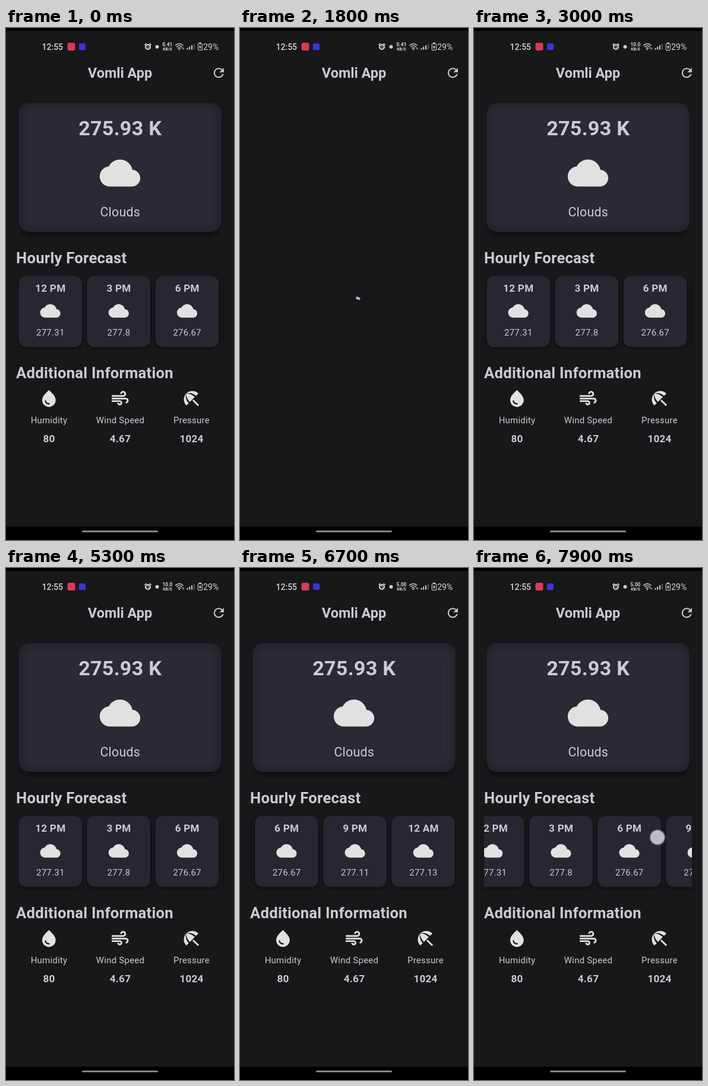
Write an HTML page that moves like this. It is 384 by 864 pixels and loops after 8000 ms.

```html
<!DOCTYPE html>
<html lang="en">
<head>
<meta charset="utf-8">
<title>Weather</title>
<style>
html, body { margin: 0; height: 100%; overflow: hidden; background: #000; }
svg { display: block; width: 100vw; height: 100vh; }
text { font-family: Roboto, "Open Sans", sans-serif; fill: #cdcad0; letter-spacing: .267px; }
.mid { text-anchor: middle; }
.b { font-weight: 700; }
.bar text { letter-spacing: 0; fill: #d6d6d6; }
.icon { fill: #e1e1e1; }
</style>
</head>
<body>
<svg viewBox="0 0 384 864">
  <defs>
    <clipPath id="listClip"><rect x="17" y="410" width="350" height="140"/></clipPath>
    <clipPath id="cardClip"><rect x="21.4" y="127" width="341.3" height="217" rx="17"/></clipPath>
    <filter id="soft" x="-10%" y="-10%" width="120%" height="120%"><feGaussianBlur stdDeviation="6"/></filter>
    <filter id="shade" x="-10%" y="-10%" width="120%" height="125%"><feGaussianBlur stdDeviation="2.2"/></filter>
    <radialGradient id="touchFill">
      <stop offset="0" stop-color="#bfbdc3" stop-opacity=".95"/>
      <stop offset=".65" stop-color="#cfcdd2" stop-opacity=".92"/>
      <stop offset=".76" stop-color="#d4d2d8" stop-opacity=".85"/>
      <stop offset=".84" stop-color="#77747f" stop-opacity=".6"/>
      <stop offset="1" stop-color="#55525c" stop-opacity="0"/>
    </radialGradient>
  </defs>

  <rect y="5" width="384" height="836.5" fill="#18181a"/>
  <rect x="128" y="848" width="128" height="3" rx="1.5" fill="#858585"/>

  <g class="bar">
    <text x="60.5" y="37" font-size="14" font-weight="500">12:55</text>
    <rect x="103.5" y="25" width="13" height="13" rx="3" fill="#d93a55"/>
    <rect x="123" y="26" width="11" height="11" rx="1.5" fill="#3d35d8"/>
    <g fill="none" stroke="#cfcfcf" stroke-linecap="round">
      <circle cx="239" cy="32" r="3.9" stroke-width="2.4"/>
      <path d="M233.8 28.4l2.2-2M244.2 28.4l-2.2-2" stroke-width="1.5"/>
      <path d="M239 30v2.3l1.5 1" stroke-width="1"/>
      <path d="M285.5 29.2q6.3-5.4 12.6 0M287.6 31.6q4.2-3.5 8.4 0M289.7 34q2.1-1.7 4.2 0" stroke-width="1.4"/>
      <path d="M297 34.5v-1.7M299 33.5v2.6" stroke-width="1.1"/>
    </g>
    <circle cx="254.5" cy="31.7" r="3" fill="#cfcfcf"/>
    <circle cx="291.8" cy="36" r="1.2" fill="#cfcfcf"/>
    <text id="speed" class="mid b" x="272" y="31.2" font-size="8.4"></text>
    <text class="mid b" x="272" y="38" font-size="6.8">KB/S</text>
    <path d="M304.5 36.5v-2.7h2v2.7zM308.2 36.5v-5h2v5zM312 36.5v-7.3h2v7.3z" fill="#cfcfcf"/>
    <path d="M315.8 36.5v-9.8h2v9.8z" fill="#58585a"/>
    <path d="M325.2 25.2h3.4" stroke="#cfcfcf" stroke-width="1.5"/>
    <rect x="323.3" y="26.5" width="7.2" height="11" rx="1.5" fill="none" stroke="#cfcfcf" stroke-width="1.1"/>
    <path d="M327.6 28l-3 4.6h1.9l-.5 3.6 3.2-4.8h-2z" fill="#d6d6d6"/>
    <text x="332.2" y="37" font-size="14">29%</text>
  </g>

  <g id="header"></g>
  <g id="page">
    <g id="fixed"></g>
    <g clip-path="url(#listClip)"><g id="list"></g></g>
  </g>
  <path id="spinner" fill="none" stroke="#b7a5e3" stroke-width="4.27" stroke-linecap="square"/>
  <circle id="touch" r="15" fill="url(#touchFill)"/>
</svg>

<script>
const $ = id => document.getElementById(id);

const ICONS = {
  cloud: 'M19.35 10.04C18.67 6.59 15.64 4 12 4 9.11 4 6.6 5.64 5.35 8.04 2.34 8.36 0 10.91 0 14c0 3.31 2.69 6 6 6h13c2.76 0 5-2.24 5-5 0-2.64-2.05-4.78-4.65-4.96z',
  refresh: 'M17.65 6.35C16.2 4.9 14.21 4 12 4c-4.42 0-8 3.58-8 8s3.58 8 8 8c3.73 0 6.84-2.55 7.73-6h-2.08c-.82 2.33-3.04 4-5.65 4-3.31 0-6-2.69-6-6s2.69-6 6-6c1.66 0 3.14.69 4.22 1.78L13 11h7V4z',
  drop: 'M12 2c-5.33 4.55-8 8.48-8 11.8 0 4.98 3.8 8.2 8 8.2s8-3.22 8-8.2C20 10.48 17.33 6.55 12 2zM7.83 14c.37 0 .67.26.74.62.41 2.22 2.28 2.98 3.64 2.87.43-.02.79.32.79.75 0 .4-.32.73-.72.75-2.13.13-4.62-1.09-5.19-4.12C7.01 14.42 7.37 14 7.83 14z',
  wind: 'M14.5 17a3 3 0 0 1-6 0h2a1 1 0 1 0 1-1H2v-2h9.5a3 3 0 0 1 3 3zM19 6.5a3.5 3.5 0 0 0-7 0h2A1.5 1.5 0 1 1 15.5 8H2v2h13.5A3.5 3.5 0 0 0 19 6.5zM18.5 11H2v2h16.5a1.5 1.5 0 0 1 0 3v2a3.5 3.5 0 0 0 0-7z',
  umbrella: 'M13.13 14.56l1.43-1.43L21 19.57 19.57 21zM17.42 8.83l2.86-2.86c-3.95-3.95-10.35-3.96-14.3-.02 3.93-1.3 8.31-.25 11.44 2.88zM5.95 5.98c-3.94 3.95-3.93 10.35.02 14.3l2.86-2.86C5.7 14.29 4.65 9.91 5.95 5.98zM5.97 5.96l-.01.01c-.38 3.01 1.17 6.88 4.3 10.02l5.73-5.73c-3.13-3.13-7.01-4.68-10.02-4.3z'
};

const icon = (name, cx, cy, size) =>
  `<path class="icon" fill-rule="evenodd" d="${ICONS[name]}" transform="translate(${cx - size / 2} ${cy - size / 2}) scale(${size / 24})"/>`;
const label = (text, x, y, size, cls = 'mid') =>
  `<text class="${cls}" x="${x}" y="${y}" font-size="${size}">${text}</text>`;
const box = (x, y, w, h, r, rest) =>
  `<rect x="${x}" y="${y}" width="${w}" height="${h}" rx="${r}" ${rest}/>`;

$('header').innerHTML =
  `<g style="letter-spacing:0">${label('Vomli App', 192, 84, 23.47, 'mid b" style="letter-spacing:0')}</g>` +
  `<g opacity=".88">${icon('refresh', 358.4, 75.7, 25.6)}</g>`;

const details = [
  ['drop', 'Humidity', '80'],
  ['wind', 'Wind Speed', '4.67'],
  ['umbrella', 'Pressure', '1024']
];
$('fixed').innerHTML =
  box(23, 133, 338, 217, 17, 'fill="#111113" filter="url(#shade)"') +
  box(21.4, 127, 341.3, 217, 17, 'fill="#25222d"') +
  `<g clip-path="url(#cardClip)">${box(29, 134, 326, 203, 14, 'fill="#2c2935" filter="url(#soft)"')}</g>` +
  label('275.93 K', 192.2, 181, 34.13, 'mid b') +
  icon('cloud', 192, 244.8, 68.27) +
  label('Clouds', 192.2, 318.4, 21.33) +
  label('Hourly Forecast', 17.1, 396.5, 25.6, 'b') +
  label('Additional Information', 17.1, 590.5, 25.6, 'b') +
  details.map(([name, title, value], i) => {
    const x = 72.3 + i * 120;
    return icon(name, x, 625.3, 34.13) + label(title, x + .2, 667.3, 14.93) +
      label(value, x + .2, 699.3, 17.07, 'mid b');
  }).join('');

const hours = [['12 PM', 277.31], ['3 PM', 277.8], ['6 PM', 276.67], ['9 PM', 277.11], ['12 AM', 277.13]];
$('list').innerHTML = hours.map(([hour, temp], i) => {
  const x = 21.3 + i * 115.2, mid = x + 53.3;
  return box(x, 421, 106.7, 119, 12.8, 'fill="#101012" filter="url(#shade)"') +
    box(x, 418.5, 106.7, 119.5, 12.8, 'fill="#292631"') +
    label(hour, mid + .2, 445.3, 17.07, 'mid b') +
    icon('cloud', mid, 477.4, 34.13) +
    label(temp, mid + .2, 518.6, 14.93);
}).join('');

// Piecewise linear value through [time, value] points
function track(points, t) {
  let [t0, v0] = points[0];
  for (const [t1, v1] of points) {
    if (t < t1) return t <= t0 ? v0 : v0 + (v1 - v0) * (t - t0) / (t1 - t0);
    [t0, v0] = [t1, v1];
  }
  return v0;
}

const scroll = [
  [5700, 0], [5800, 17], [5900, 85], [6000, 165], [6100, 206], [6200, 220], [6300, 225], [6400, 226.6],
  [7500, 226.6], [7600, 222], [7700, 174], [7800, 106], [7900, 43.4]
];
const SLOP = 19;

// Cubic bezier (.4, 0, .2, 1)
function ease(x) {
  let lo = 0, hi = 1;
  for (let i = 0; i < 20; i++) {
    const s = (lo + hi) / 2, r = 1 - s;
    if (1.2 * r * r * s + .6 * r * s * s + s ** 3 < x) lo = s; else hi = s;
  }
  return lo * lo * (3 - 2 * lo);
}

function arc(ms) {
  const u = ms / 1333 % 1, turn = Math.PI * 1.5;
  const head = ease(Math.min(u * 2, 1)), tail = ease(Math.max(u * 2 - 1, 0));
  const start = -Math.PI / 2 + tail * turn + ms / 2222 * 2 * Math.PI + u * Math.PI / 2;
  const sweep = Math.max((head - tail) * turn, .001);
  const at = a => `${192 + 19.2 * Math.cos(a)} ${474 + 19.2 * Math.sin(a)}`;
  return `M${at(start)}A19.2 19.2 0 ${+(sweep > Math.PI)} 1 ${at(start + sweep)}`;
}

function draw() {
  const t = Math.floor(performance.now() % 8000 / 100) * 100;
  const loading = t >= 1800 && t < 3000;
  const offset = track(scroll, t);

  $('page').style.display = loading ? 'none' : '';
  $('spinner').style.display = loading ? '' : 'none';
  if (loading) $('spinner').setAttribute('d', arc(Math.min(t, t < 2100 ? 1900 : 2600) - 1728));

  $('list').setAttribute('transform', `translate(${-offset} 0)`);
  $('speed').textContent = t < 2300 ? '0.41' : t < 6300 ? '10.0' : '5.00';

  const left = t >= 5700 && t <= 6100, right = t >= 7500;
  $('touch').style.display = left || right ? '' : 'none';
  const slip = SLOP * Math.min((t - (left ? 5700 : 7500)) / 100, 1);
  $('touch').setAttribute('cx', left ? 304 - offset - slip : 106.8 + 226.6 - offset + slip);
  $('touch').setAttribute('cy', left ? 472 + offset * .109 : 478 - (226.6 - offset) * .128);
  requestAnimationFrame(draw);
}
draw();
</script>
</body>
</html>
```
